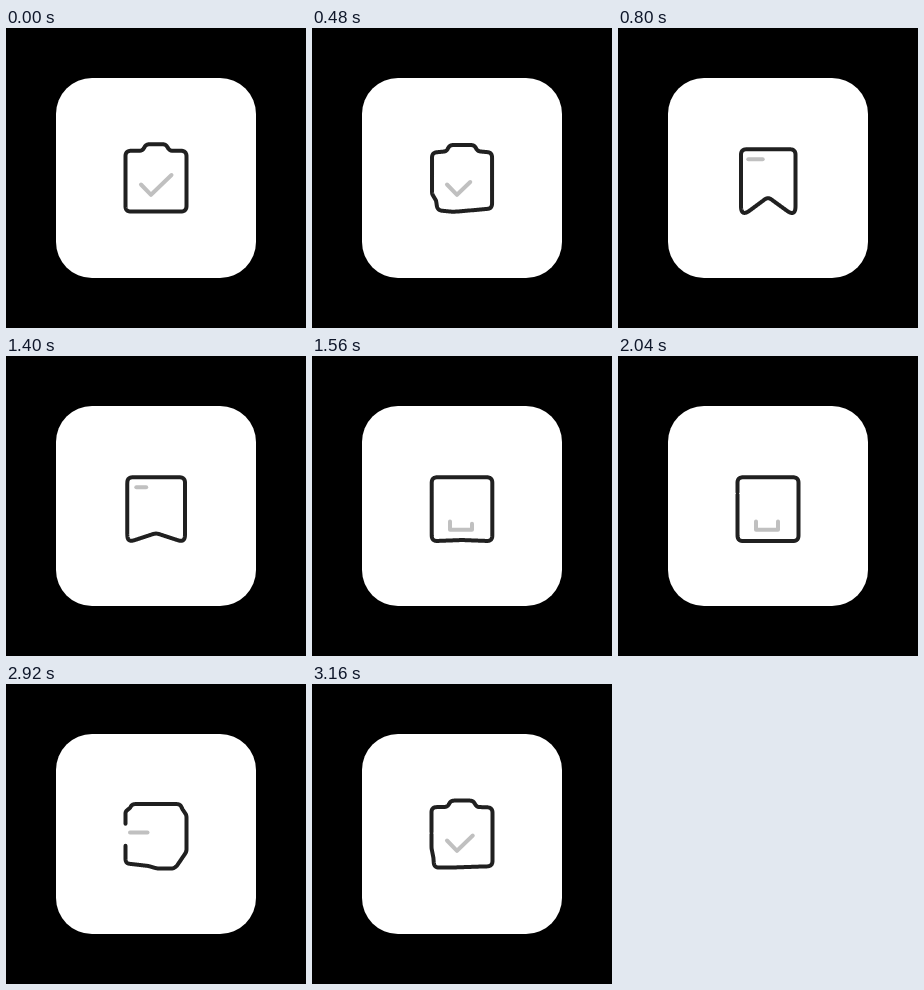
Write an HTML page with a canvas that moves like this. It is 300 px wide and 300 px high and loops after 3.2 s.

```html
<!DOCTYPE html>
<html lang="en">
<head>
<meta charset="utf-8">
<title>Icon morph</title>
<style>
  html, body { margin: 0; width: 100%; height: 100%; overflow: hidden; background: #000; }
  canvas { display: block; width: 300px; height: 300px; }
</style>
</head>
<body>
<canvas id="stage" width="300" height="300"></canvas>
<script>
const ctx = document.getElementById('stage').getContext('2d');
const LOOP = 3200, PHASE = 800, HOLD = 400, STEP = 40;
const DASH = 48, RADIUS = 5.5, ARC = 16, SAMPLES = 80;
const LEFT = 119.5, RIGHT = 180.5, TOP = 121.3;

const mix = (a, b, k) => a + (b - a) * k;
const mixPoint = (a, b, k) => [mix(a[0], b[0], k), mix(a[1], b[1], k)];
const distance = (a, b) => Math.hypot(b[0] - a[0], b[1] - a[1]);
const ease = p => (p + (1 - Math.cos(Math.PI * p)) / 2) / 2;

// Points along the rounded corner at b, between its neighbours a and c.
function roundCorner(a, b, c) {
  if (!a || !c) return Array(ARC + 1).fill(b);
  const la = distance(a, b), lc = distance(b, c);
  const cos = ((a[0] - b[0]) * (c[0] - b[0]) + (a[1] - b[1]) * (c[1] - b[1])) / (la * lc);
  const trim = Math.min(RADIUS * Math.sqrt(Math.max(0, 1 + cos) / (1 - cos)), la / 2, lc / 2);
  const from = mixPoint(b, a, trim / la), to = mixPoint(b, c, trim / lc);
  return Array.from({ length: ARC + 1 }, (_, i) => {
    const u = i / ARC;
    return mixPoint(mixPoint(from, b, u), mixPoint(b, to, u), u);
  });
}

// Evenly spaced points along a polyline.
function resample(line) {
  const sizes = line.slice(1).map((point, i) => distance(line[i], point));
  const total = sizes.reduce((sum, size) => sum + size, 0);
  let i = 0, passed = 0;
  return Array.from({ length: SAMPLES + 1 }, (_, n) => {
    const goal = total * n / SAMPLES;
    while (i < sizes.length - 1 && passed + sizes[i] < goal) passed += sizes[i++];
    return mixPoint(line[i], line[i + 1], sizes[i] ? Math.min(1, (goal - passed) / sizes[i]) : 0);
  });
}

// Key corners of one outline meet the same key corners of the next.
function trace(corners, keys = corners.map((_, i) => i)) {
  const arcs = corners.map((b, i) => roundCorner(corners[i - 1], b, corners[i + 1]));
  return keys.slice(1).flatMap((end, i) => resample([
    ...arcs[keys[i]].slice(ARC / 2),
    ...arcs.slice(keys[i] + 1, end).flat(),
    ...arcs[end].slice(0, ARC / 2 + 1)
  ]));
}

function panel(left, right, foot, notch, start, end) {
  return trace([
    [left, start], [left, TOP], [right, TOP], [right, foot],
    [150, notch], [left, foot], [left, end]
  ]);
}

function clipboard() {
  const shoulder = 122.8, tab = 116.3, base = 183.5, start = [LEFT, 149];
  return trace([
    start, [LEFT, shoulder], [136.5, shoulder], [140, tab],
    [160, tab], [163.5, shoulder], [RIGHT, shoulder], [RIGHT, base],
    [137, base], [LEFT, base], [LEFT, 173], [LEFT, 163], start
  ], [0, 3, 4, 8, 10, 11, 12]);
}

const icons = [
  { outline: clipboard(), accent: [[135, 156.5], [145, 166.8], [165.5, 147]] },
  { outline: panel(123, 177.5, 189, 169, 150, 150), accent: [[130.3, 131.3], [144.7, 131.3]] },
  { outline: panel(LEFT, RIGHT, 185, 185, 136.5, 136.5),
    accent: [[138, 165.5], [138, 173.8], [160, 173.8], [160, 165.5]] },
  { outline: panel(LEFT, RIGHT, 185, 185, 136.5, 166), accent: [[124, 148.5], [141.5, 148.5]] }
];

function stroke(points, color) {
  ctx.beginPath();
  points.forEach(point => ctx.lineTo(...point));
  ctx.strokeStyle = color;
  ctx.stroke();
}

function drawAccent(points, length) {
  if (length <= 0) return;
  const shown = [points[0]];
  for (let i = 1; i < points.length && length > 0; i++) {
    const size = distance(points[i - 1], points[i]);
    shown.push(mixPoint(points[i - 1], points[i], Math.min(1, length / size)));
    length -= size;
  }
  stroke(shown, '#c0c0c0');
}

function render(time) {
  const t = Math.floor((time % LOOP) / STEP) * STEP;
  const index = Math.floor(t / PHASE);
  const p = Math.max(0, (t % PHASE - HOLD) / (PHASE - HOLD));
  const from = icons[index], to = icons[(index + 1) % icons.length];

  ctx.fillStyle = '#000';
  ctx.fillRect(0, 0, 300, 300);
  ctx.fillStyle = '#fff';
  ctx.beginPath();
  ctx.roundRect(50, 50, 200, 200, 36);
  ctx.fill();

  ctx.lineWidth = 4;
  ctx.lineCap = ctx.lineJoin = 'round';
  drawAccent(from.accent, DASH * (1 - p / 0.63));
  drawAccent(to.accent, DASH * (p - 0.59) / 0.41);
  const e = ease(p);
  stroke(from.outline.map((point, i) => mixPoint(point, to.outline[i], e)), '#202020');
}

const begin = performance.now();
function tick() {
  render(performance.now() - begin);
  requestAnimationFrame(tick);
}
tick();
</script>
</body>
</html>
```
